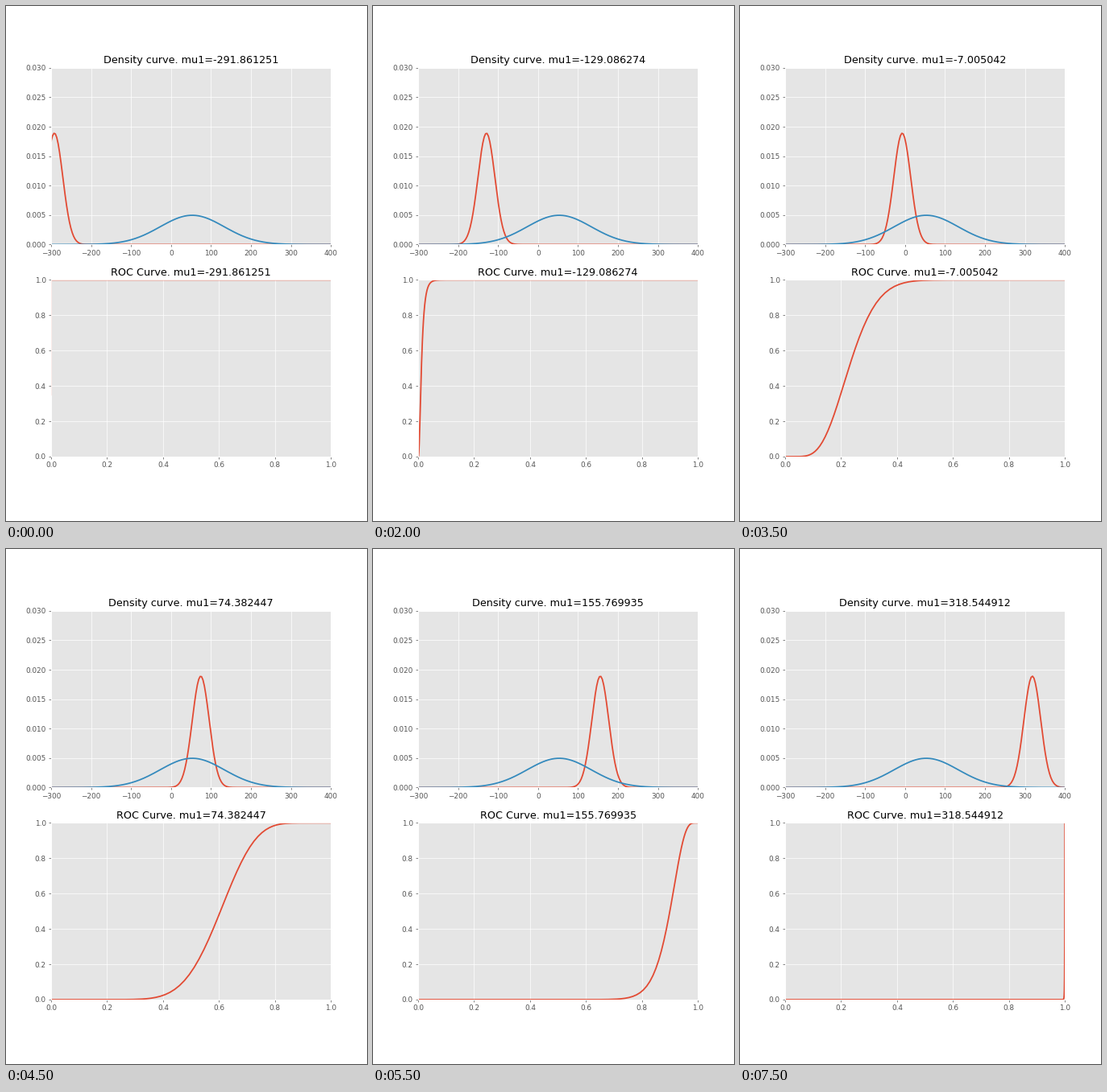
A matplotlib script for the animation above (8000 ms loop, 448 px wide and 640 px high).

```python
import math

import matplotlib.pyplot as plt
import numpy as np
from matplotlib.animation import FuncAnimation

FRAMES = 16
INTERVAL = 500
MU_START, MU_STEP = -291.8612512, 40.6937442
SIGMA1 = 21.1
MU2, SIGMA2 = 53.0, 80.3


def pdf(x, mu, sigma):
    return np.exp(-0.5 * ((x - mu) / sigma) ** 2) / (sigma * math.sqrt(2 * math.pi))


def cdf(x, mu, sigma):
    z = (x - mu) / (sigma * math.sqrt(2))
    return np.array([0.5 * math.erfc(-v) for v in z])


plt.style.use("ggplot")
plt.rcParams["font.family"] = "DejaVu Sans"

fig, (ax_pdf, ax_roc) = plt.subplots(2, 1, figsize=(7, 10), dpi=64)
fig.set_facecolor("white")
fig.subplots_adjust(left=0.125, right=0.9, bottom=0.125, top=0.88, hspace=0.2)

x = np.linspace(-300, 400, 200)
fpr = cdf(x, MU2, SIGMA2)

red_line, = ax_pdf.plot([], [], lw=2)
ax_pdf.plot(x, pdf(x, MU2, SIGMA2), lw=2)
ax_pdf.set(xlim=(-300, 400), ylim=(0, 0.03))

roc_line, = ax_roc.plot([], [], lw=2)
ax_roc.set(xlim=(0, 1), ylim=(0, 1))

pdf_title = ax_pdf.set_title("")
roc_title = ax_roc.set_title("")


def update(i):
    mu = MU_START + MU_STEP * i
    red_line.set_data(x, pdf(x, mu, SIGMA1))
    roc_line.set_data(fpr, cdf(x, mu, SIGMA1))
    pdf_title.set_text(f"Density curve. mu1={mu:.6f}")
    roc_title.set_text(f"ROC Curve. mu1={mu:.6f}")
    return red_line, roc_line, pdf_title, roc_title


anim = FuncAnimation(fig, update, frames=FRAMES, init_func=lambda: update(0),
                     interval=INTERVAL, repeat=True, repeat_delay=0)
plt.show()
```
